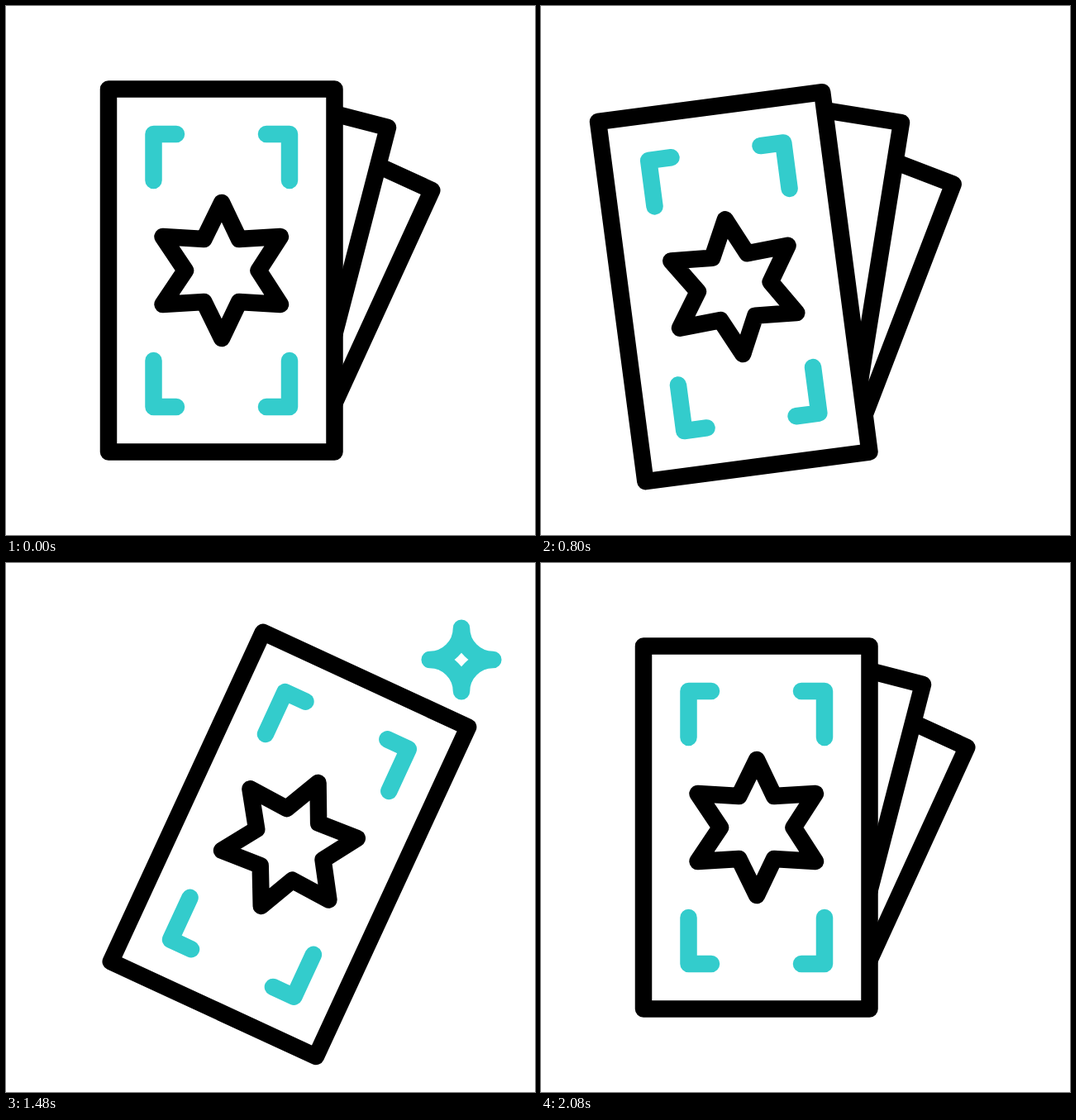
Animation of 640 by 640 pixels, one loop 2.2 s. Source, as an HTML page:

```html
<!DOCTYPE html>
<html lang="en">
<head>
<meta charset="utf-8">
<title>Tarot cards</title>
<style>
  html, body { margin: 0; width: 100%; height: 100%; overflow: hidden; background: #fff; }
  svg { display: block; width: 100vw; height: 100vh; }
  path { fill: #fff; stroke: #000; stroke-width: 20.5; stroke-linecap: round; stroke-linejoin: round; }
  .accent { fill: none; stroke: #3cc; }
</style>
</head>
<body>
<svg viewBox="0 0 640 640">
  <!-- back cards: origin at the top right corner -->
  <path id="back" d="M-90 0H0V300"/>
  <path id="middle" d="M-110 0H0V360"/>
  <!-- front card: origin at the bottom right corner -->
  <g id="front">
    <g transform="translate(-397.5 -539.5)">
      <path d="M124 100.5H397.5V539.5H124Z"/>
      <path d="M261 238L282 282L332 279L305.5 320L332 361L282 358L261 402L239.5 358L189.5 361L217 320L189.5 279L239.5 282Z"/>
      <path class="accent" d="M178.5 211V155H206M315 155H343V211M178.5 429V485H206M315 485H343V429"/>
    </g>
  </g>
  <path id="spark1" class="accent" transform="translate(551 117)"/>
  <path id="spark2" class="accent" transform="translate(549 421)"/>
</svg>
<script>
const LOOP = 2200, STEP = 40, END = 52;
const el = id => document.getElementById(id);
const clamp = x => Math.min(1, Math.max(0, x));
const smooth = x => x * x * (3 - 2 * x);

// Fast start, long settle
const ease = (tick, start, length) =>
  1 - (1 - clamp((tick - start) / length) ** 1.3) ** 3.7;

// Poses as [x, y, angle]: at rest, leaning left, leaning right
const cards = {
  back: [[515.3, 223, 24.6], [498.7, 215.5, 21], [508.75, 290, 29.2]],
  middle: [[462, 147, 14.5], [436, 141, 9.1], [495, 222, 24]],
  front: [[397.5, 539.5, 0], [397.5, 539.5, -7.5], [375, 597, 24.8]]
};

function drawCards(tick) {
  const left = ease(tick, 5, 14.5);
  const right = ease(tick, 21, 16.6);
  const home = ease(tick, 37, 15.1);
  for (const id in cards) {
    const [rest, a, b] = cards[id];
    const [x, y, angle] = rest.map((r, i) =>
      r + (a[i] - r) * left + (b[i] - a[i]) * right + (r - b[i]) * home);
    el(id).setAttribute("transform", `translate(${x} ${y}) rotate(${angle})`);
  }
}

// Four-pointed star that pops past its size, then settles
function drawSpark(id, tick, start, peak, size) {
  const grow = clamp((tick - start) / 6);
  const settle = smooth(clamp((tick - start - 6) / 7));
  const r = peak * grow * (2 - grow) - (peak - size) * settle;
  const arc = (x, y) => `A${r} ${r} 0 0 0 ${x} ${y}`;
  const shown = grow > 0 && tick < END;
  el(id).setAttribute("d", shown
    ? `M0 ${-r}${arc(r, 0)}${arc(0, r)}${arc(-r, 0)}${arc(0, -r)}Z` : "");
}

const began = performance.now();

function draw() {
  const time = (performance.now() - began) % LOOP;
  const tick = Math.floor(time / STEP);
  drawCards(tick);
  drawSpark("spark1", tick, 35, 69, 58);
  drawSpark("spark2", tick, 37.3, 70, 60);
  requestAnimationFrame(draw);
}
draw();
</script>
</body>
</html>
```
